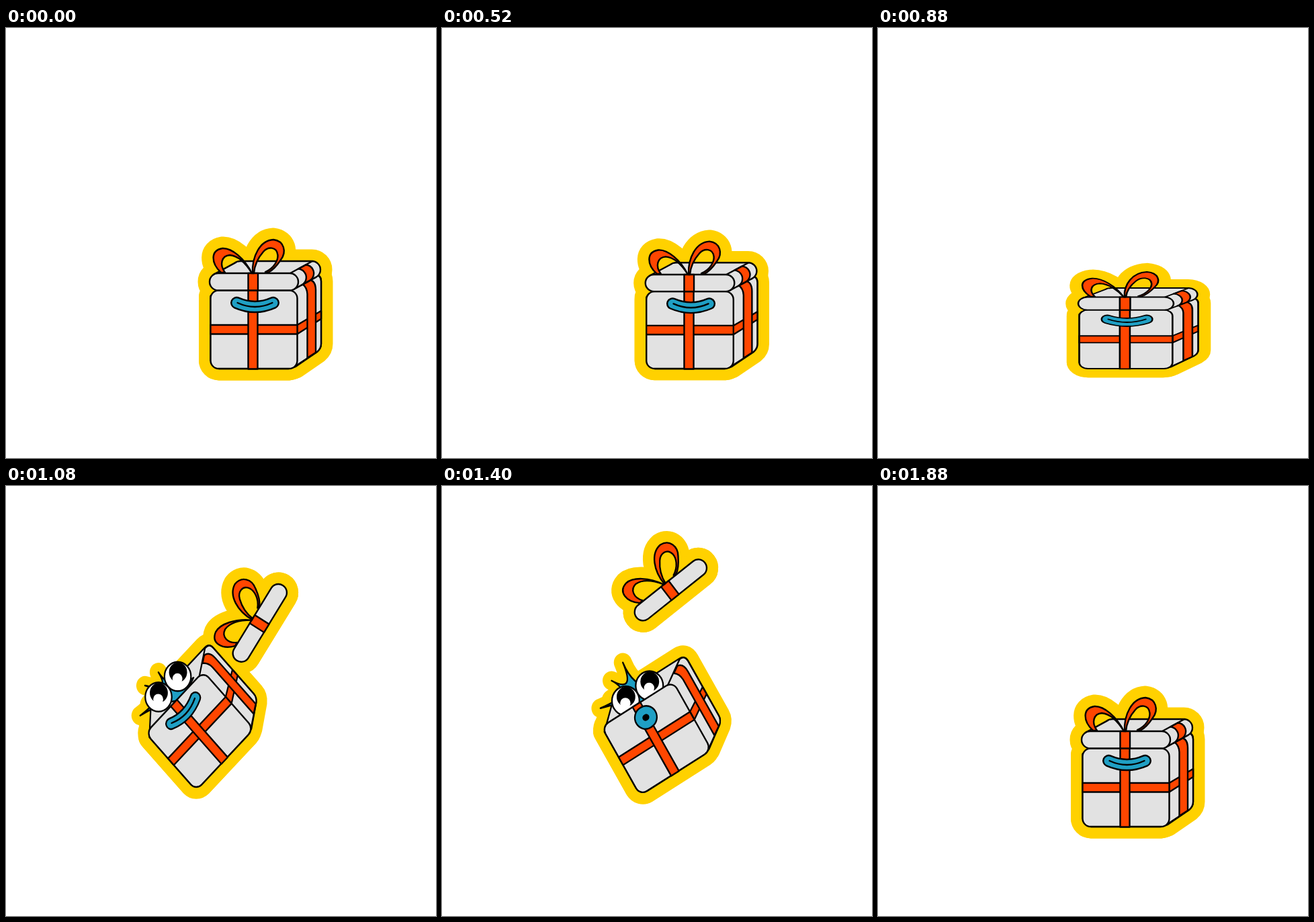
Write an HTML page with a canvas that moves like this. It is 640 px wide and 640 px high and loops after 2.44 s.

```html
<!DOCTYPE html>
<html lang="en">
<head>
<meta charset="utf-8">
<title>Gift box</title>
<style>
html, body { margin: 0; width: 100%; height: 100%; overflow: hidden; background: #fff; }
canvas { display: block; }
</style>
</head>
<body>
<canvas id="stage" width="640" height="640"></canvas>
<script>
const ctx = document.getElementById('stage').getContext('2d');
const LOOP = 2440, STEP = 40, LINE = 2.4;
const JUMP = 880, LAND = 1560, CATCH = 1720;
const GREY = '#e2e2e2', RED = '#ff4600', TEAL = '#1f9fc4', YELLOW = '#ffd100';

// Resting centres of the front face and the lid's front slab
const FLOOR = 507, BOX = [369, 449], LID = [369, 378];

// Flight of the lid: time, x, y, turn
const lidPath = [
  [JUMP, 369, 410, 0],
  [1080, 378, 204, -58],
  [1240, 356, 98, -48],
  [1400, 340.5, 155, -38],
  [1600, 353, 220, -195],
  [CATCH, 369, 378, -360]
];

const clamp = v => Math.max(0, Math.min(1, v));
const ease = v => (v = clamp(v)) * v * (3 - 2 * v);
const svg = d => new Path2D(d);

// Smooth interpolation that never overshoots a key
function sample(keys, t) {
  const last = keys.length - 1;
  const i = Math.max(0, keys.findLastIndex(k => k[0] <= t));
  if (i === last) return keys[last].slice(1);
  const slope = (k, c) => k < 0 || k >= last ? 0 :
    (keys[k + 1][c] - keys[k][c]) / (keys[k + 1][0] - keys[k][0]);
  const tangent = (k, c) => {
    const a = slope(k - 1, c), b = slope(k, c);
    return a * b <= 0 ? 0 : 2 * a * b / (a + b);
  };
  const a = keys[i], b = keys[i + 1], h = b[0] - a[0], u = (t - a[0]) / h, w = 1 - u;
  return [1, 2, 3].map(c => a[c] + (b[c] - a[c]) * ease(u)
    + h * u * w * (tangent(i, c) * w - tangent(i + 1, c) * u));
}

// One damped squash-and-stretch swing
function wobble(t, period, size) {
  const v = t / period;
  return v > 0 && v < 1 ? -size * Math.sin(2 * Math.PI * v) * Math.exp(-1.5 * v) : 0;
}

function height(t) {
  const crouch = t <= JUMP ? .25 * ease((t - 460) / 420) : 0;
  return 1 - crouch + wobble(t, 460, .25) + wobble(t - LAND, 160, .17) + wobble(t - CATCH, 160, .34);
}

const width = tall => 1 + .3 * (1 - tall);

function boxPose(t) {
  const u = (t - JUMP) / (LAND - JUMP);
  const flying = u > 0 && u < 1;
  const sy = flying ? 1.02 : height(t);
  const pose = { x: BOX[0], y: FLOOR - 58 * sy, turn: 0, sx: width(sy), sy };
  if (flying) {
    const swing = skew => Math.sin(Math.PI * u ** skew);
    pose.x -= 87 * swing(.8);
    pose.y -= 400 * u * (1 - u);
    pose.turn = -50.3 * swing(.88);
    pose.sx = 1.01 - .09 * swing(.8);
  }
  pose.out = Math.min(clamp((t - JUMP) / 180), clamp((CATCH - t) / 640) ** .4);
  pose.open = t > 1200 && t < 1600 ? Math.sin(Math.PI * (t - 1200) / 400) : 0;
  pose.shut = t > 1540;
  return pose;
}

function lidPose(t) {
  if (t <= JUMP || t >= CATCH) {
    const sy = height(t);
    return { x: LID[0], y: FLOOR - 129 * sy, turn: 0, sx: width(sy), sy, depth: 1 };
  }
  const [x, y, turn] = sample(lidPath, t);
  const depth = Math.max(0, 1 - (t - JUMP) / 150, (t - 1480) / 280);
  return { x, y, turn, sx: .98, sy: 1, depth };
}

function posed({ x, y, turn, sx, sy }, [ox, oy], draw) {
  ctx.save();
  ctx.translate(x, y);
  ctx.scale(sx, sy);
  ctx.rotate(turn * Math.PI / 180);
  ctx.translate(-ox, -oy);
  draw();
  ctx.restore();
}

function stroke(path, color = '#000', size = LINE) {
  ctx.strokeStyle = color;
  ctx.lineWidth = size;
  ctx.stroke(path);
}

function fill(path, color) {
  ctx.fillStyle = color;
  ctx.fill(path);
}

function shape(path, color) {
  fill(path, color);
  stroke(path);
}

function halo(path, size = 35) {
  fill(path, YELLOW);
  stroke(path, YELLOW, size);
}

function rounded(x, y, w, h, r) {
  const p = new Path2D();
  p.roundRect(x, y, w, h, r);
  return p;
}

function disc(x, y, r) {
  const p = new Path2D();
  p.arc(x, y, r, 0, 7);
  return p;
}

// Box parts
const shell = svg('M304.5 399L339 367H459Q469 367 469 377V470Q469 477 463 482L431 504L420 507H317L304.5 495Z');
const front = rounded(304.5, 390.5, 129, 116.5, 12);
const side = svg('M424 391L459 368Q469 367 469 377V470Q469 477 463 482L428 505L433 495V402Z');
const sideBand = svg('M433.5 442L469 421V433L433.5 455.5Z');
const sideStrap = svg('M441 381L451 374.5Q461 376 461 390V483L448.5 491V396Q448 386 441 381Z');
const band = svg('M304.5 442H433.5V455.5H304.5Z');
const strap = svg('M360.5 390.5H374.5V507.5H360.5Z');

// Lid parts
const slab = rounded(303, 365, 132, 25.5, 12.75);
const knot = svg('M360.5 365H375V390.5H360.5Z');
const bow = [
  svg('M366 365C355 343 336 327 322 328C304 331 305 350 320 364H326C317 352 321 339 333 338C346 339 358 352 366 365Z'),
  svg('M367 365C366 340 378 316 398 315C414 317 418 333 409 345C403 354 397 361 390 364L386 363C400 357 405 345 404.5 338C403 325 390 325 383 333C375 342 370 353 369 365Z')
];

function spikes({ out, open }) {
  const k = clamp(out * 1.3), cx = 8, cy = -62;
  const at = (x, y) => [BOX[0] + cx + (x - cx) * k, BOX[1] + cy + (y - cy) * k];
  const p = new Path2D();
  p.moveTo(...at(-53, -83));
  for (const tip of [[-17, -109], [12, -108 - 15 * open], [47, -63]])
    p.quadraticCurveTo(...at(6, -73), ...at(...tip));
  p.lineTo(...at(12, -52));
  p.quadraticCurveTo(...at(-12, -72), ...at(-53, -83));
  return p;
}

function eye(x, y, turn, shut) {
  ctx.save();
  ctx.translate(x, y);
  ctx.rotate(-turn * Math.PI / 180);
  shape(disc(0, 0, 21.3), shut ? GREY : '#fff');
  if (!shut) {
    fill(disc(0.5, -6, 14.5), '#000');
    fill(disc(-0.5, 3.5, 8), '#fff');
  }
  ctx.restore();
}

function mouth(open) {
  const half = 26.5 * (1 - open) + .8, size = 13.5 + 17 * open;
  const y = 409 + 5 * open, bend = 12 * (1 - open);
  const curve = h => svg(`M${370.5 - h} ${y}Q370.5 ${y + bend} ${370.5 + h} ${y}`);
  stroke(curve(half), '#000', size + 2 * LINE);
  stroke(curve(half), TEAL, size);
  stroke(curve(half * .95), '#000', LINE + 7 * open);
}

function drawBox(pose) {
  const { out, open, turn, shut } = pose;
  shape(shell, GREY);
  if (out > 0) {
    if (!shut) shape(spikes(pose), TEAL);
    for (const x of [356, 399]) eye(x, 409 - 42 * out, turn, shut);
  }
  shape(side, GREY);
  shape(sideBand, RED);
  shape(sideStrap, RED);
  shape(front, GREY);
  shape(band, RED);
  shape(strap, RED);
  mouth(open);
}

// The lid is its front slab swept backwards
function sweepLid(depth) {
  const dx = 33 * depth, dy = -18 * depth;
  const back = new Path2D();
  back.addPath(slab, new DOMMatrix().translate(dx, dy));
  const edge = (x, y) => `M${x} ${y}l${dx} ${dy}`;
  const sweep = svg(`${edge(309.6, 366.6)}L${428.4 + dx} ${388.9 + dy}L428.4 388.9Z`);
  const edges = svg(edge(309.6, 366.6) + edge(428.4, 388.9) + edge(423, 365));
  const ribbon = new Path2D();
  const cap = (f, ...angles) => ribbon.arc(422.25 + dx * f, 377.75 + dy * f, 12.75, ...angles);
  cap(.36, -1.5, 1.07);
  cap(.7, 1.07, -1.5, true);
  ribbon.closePath();
  return { back, sweep, edges, ribbon };
}

function drawLid({ depth }) {
  if (depth > 0) {
    const { back, sweep, edges, ribbon } = sweepLid(depth);
    shape(back, GREY);
    fill(sweep, GREY);
    shape(ribbon, RED);
    stroke(edges);
  }
  shape(slab, GREY);
  shape(knot, RED);
  for (const loop of bow) shape(loop, RED);
}

function render(t) {
  const box = boxPose(t), lid = lidPose(t);
  ctx.clearRect(0, 0, 640, 640);
  ctx.lineJoin = ctx.lineCap = 'round';
  posed(box, BOX, () => {
    halo(shell);
    halo(front);
    if (box.out > 0 && !box.shut) halo(spikes(box), 28);
  });
  posed(lid, LID, () => {
    const { back, sweep } = sweepLid(lid.depth);
    for (const part of [slab, back, sweep, ...bow]) halo(part);
  });
  posed(box, BOX, () => drawBox(box));
  posed(lid, LID, () => drawLid(lid));
}

function tick() {
  render(Math.floor(performance.now() % LOOP / STEP) * STEP);
  requestAnimationFrame(tick);
}
tick();
</script>
</body>
</html>
```
